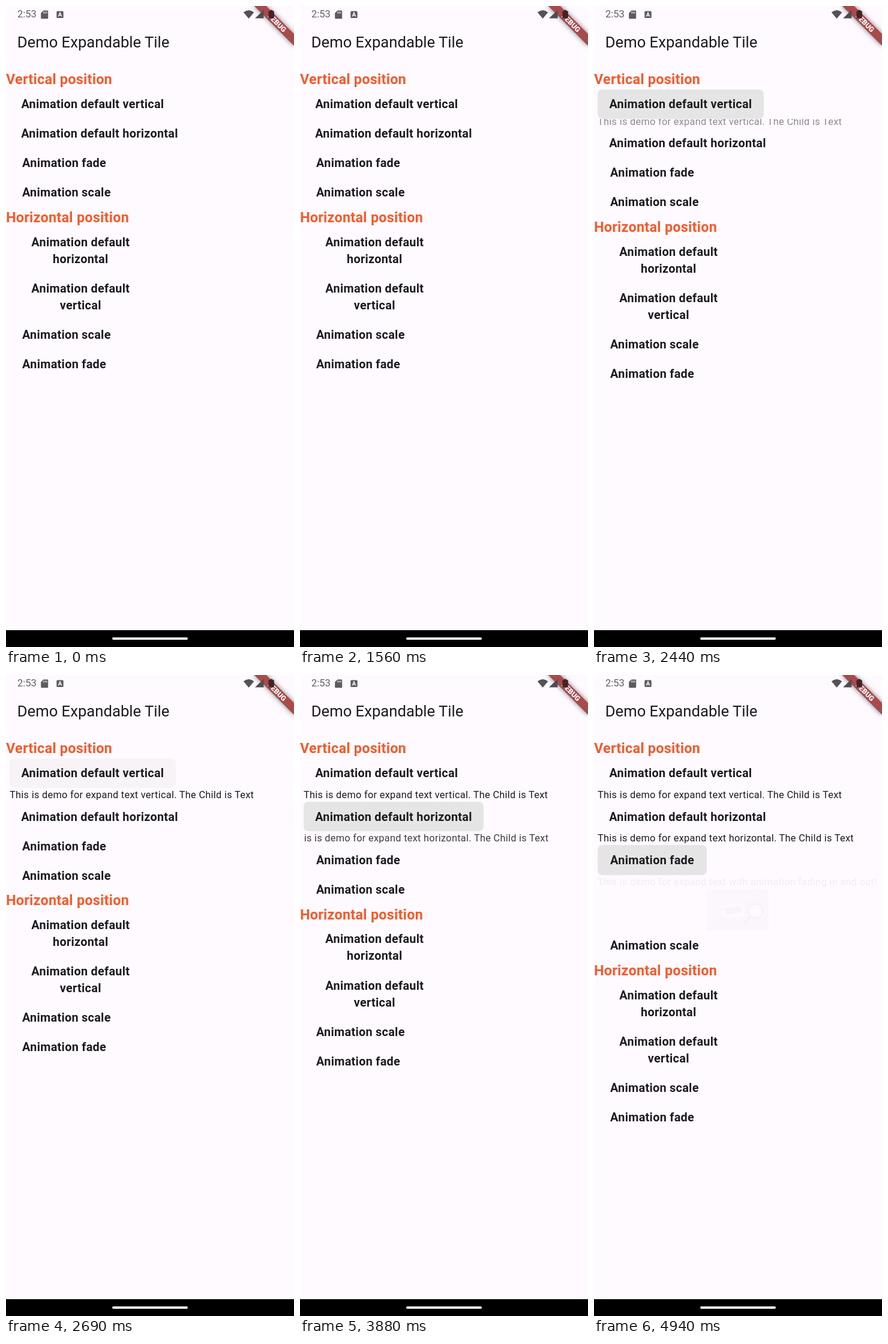
An HTML page for the animation above (5 s loop, 480 px wide and 1067 px high).

```html
<!DOCTYPE html>
<html lang="en">
<head>
<meta charset="utf-8">
<title>Expandable tiles</title>
<style>
  html, body { margin: 0; width: 100%; height: 100%; overflow: hidden; background: #fffaff; }
  #stage {
    position: relative; width: 480px; height: 1067px; overflow: hidden;
    background: #fffaff; color: #1c1b1f; font-family: Roboto, sans-serif;
  }
  #stage > * { position: absolute; }
  .clock { left: 19px; top: 4px; font-size: 16.5px; line-height: 20px; color: #626064; }
  .title { left: 18.7px; top: 45px; font-size: 25.67px; line-height: 30px; white-space: nowrap; }
  .list { left: 0; top: 105.3px; width: 480px; letter-spacing: .29px; white-space: nowrap; }
  .head { height: 33.3px; line-height: 33.3px; font-size: 23.33px; font-weight: 700; color: #f55a2c; }
  .head span, .tile span { position: relative; top: 1px; }
  .tile { position: relative; padding: 10.55px 0; margin-left: 6px; font-size: 19.83px; line-height: 28px; font-weight: 700; text-align: center; }
  .ink { position: absolute; inset: 0; border-radius: 8px; overflow: hidden; }
  .panel { height: 0; margin-left: 6px; overflow: hidden; font-size: 16.33px; line-height: 23.33px; }
  .fade { width: 466px; }
  .fade svg { display: block; margin: 0 auto; }
  .banner {
    left: 405.25px; top: 21.05px; width: 93.4px; height: 14px; transform: rotate(45deg);
    background: #a94a4b; box-shadow: 0 0 9px rgba(0,0,0,.5);
    color: #fff; font-size: 11.9px; line-height: 14px; font-weight: 900; text-align: center;
  }
  .icons { left: 0; top: 0; }
  .nav { left: 0; top: 1039px; width: 480px; height: 28px; background: #000; }
  .nav::after { content: ""; position: absolute; left: 177px; top: 12px; width: 126px; height: 4px; border-radius: 2px; background: #f4f2f4; }
</style>
</head>
<body>
<div id="stage">
  <div class="title">Demo Expandable Tile</div>
  <div class="list" id="list"></div>
  <div class="banner">DEBUG</div>
  <div class="clock">2:53</div>
  <svg class="icons" width="480" height="28" fill="#5c5a5e">
    <path d="M62.5 7.5H69q1.2 0 1.2 1.2V20q0 1.2-1.2 1.2H59.4q-1.2 0-1.2-1.2V11.8Z"/>
    <path d="M62.9 9.6v2.8M65.3 9.6v2.8M67.7 9.6v2.8" stroke="#fffaff" stroke-width="1.1"/>
    <rect x="84.3" y="8.6" width="11.4" height="11.4" rx="1.5"/>
    <path d="M87.2 17.6 90 10.9 92.8 17.6M88.3 15.5h3.4" fill="none" stroke="#fffaff" stroke-width="1.3"/>
    <path d="M395.8 10.6Q404.6 3.6 413.4 10.6L404.6 21Z" fill="#545256"/>
    <path d="M429.5 6.5V20.6H415Z" fill="#4f4c50"/>
    <path d="M440 8.3V6.8h4.2v1.5h1.6q1 0 1 1v10.4q0 1-1 1h-7.4q-1 0-1-1V9.3q0-1 1-1Z" fill="#3f2428"/>
  </svg>
  <div class="nav"></div>
</div>
<script>
const LOOP = 5000, STEP = 62.5, LINE = 23.33;
const list = document.getElementById('list');

function add(parent, cls, html = '') {
  const el = document.createElement('div');
  el.className = cls;
  el.innerHTML = html;
  parent.append(el);
  return el;
}

const head = label => add(list, 'head', `<span>${label}</span>`);

function tile(label, width) {
  const el = add(list, 'tile', `<div class="ink"></div><span>${label}</span>`);
  el.style.width = width + 'px';
  return el.firstChild;
}

function panel(html, cls = '') {
  const el = add(list, 'panel ' + cls);
  return { el, body: add(el, '', html) };
}

const picture = `<svg width="104" height="70" viewBox="0 0 104 70">
  <defs><linearGradient id="tone" x2="1" y2="1">
    <stop stop-color="#d8d6da"/><stop offset="1" stop-color="#bdbbbf"/>
  </linearGradient></defs>
  <rect width="104" height="70" fill="url(#tone)"/>
  <path d="M24 29 60 22 66 45 30 50Z" fill="#f3f1f4"/>
  <path d="M31 33 58 28 60 38 35 43Z" fill="#98969a"/>
  <circle cx="82" cy="37" r="12" fill="#eeecef" stroke="#77757a" stroke-width="2.5"/>
  <path d="M73 47 63 58" stroke="#77757a" stroke-width="4" stroke-linecap="round"/>
</svg>`;

head('Vertical position');
const inkV = tile('Animation default vertical', 276.8);
const vert = panel('This is demo for expand text vertical. The Child is Text');
const inkH = tile('Animation default horizontal', 300);
const horiz = panel('This is demo for expand text horizontal. The Child is Text');
horiz.body.style.width = 'max-content';
const inkF = tile('Animation fade', 182.2);
const fade = panel('This is demo for expand text with animation fading in and out!' + picture, 'fade');
tile('Animation scale', 189.6);
head('Horizontal position');
tile('Animation default<br>horizontal', 236.6);
tile('Animation default<br>vertical', 236.6);
tile('Animation scale', 189.6);
tile('Animation fade', 182.2);

const clamp = v => Math.min(1, Math.max(0, v));
const easeOut = p => 1 - Math.pow(1 - p, 1.65);

// Highlight strength for each step after a press
const glow = [.19, .38, .38, .38, .3, .2, .13, .07];

function press(ink, t, start, x, rest = 0) {
  const k = Math.round((t - start) / STEP);
  const a = k < 0 ? 0 : k < glow.length ? glow[k] : rest;
  ink.style.backgroundColor = `rgba(190,195,190,${a})`;
  ink.style.backgroundImage = k === 0
    ? `radial-gradient(circle 42px at ${x}px 27px, rgba(0,0,0,.06), rgba(0,0,0,.045) 60%, transparent)`
    : 'none';
}

function draw(now) {
  const step = Math.min(79, Math.floor((now % LOOP + 2.5) / STEP));
  const t = step * STEP;

  press(inkV, t, 2312.5, 150);
  press(inkH, t, 3687.5, 181, t < 4812 ? .04 : 0);
  press(inkF, t, 4812.5, 95);

  const pv = clamp((t - 2347) / 180), sv = easeOut(pv);
  vert.el.style.height = LINE * sv + 'px';
  vert.body.style.transform = `translateY(${-LINE * (1 - sv)}px)`;
  vert.body.style.opacity = pv;

  const ph = clamp((t - 3722) / 180);
  horiz.el.style.height = (ph > 0 ? LINE : 0) + 'px';
  horiz.body.style.transform = `translateX(${-100 * (1 - easeOut(ph))}%)`;
  horiz.body.style.opacity = ph;

  const pf = clamp((t - 4920) / 300);
  fade.el.style.height = (pf > 0 ? LINE + 70 : 0) + 'px';
  fade.body.style.opacity = pf;
}

const begin = performance.now();
function tick() {
  draw(performance.now() - begin);
  requestAnimationFrame(tick);
}
tick();
</script>
</body>
</html>
```
